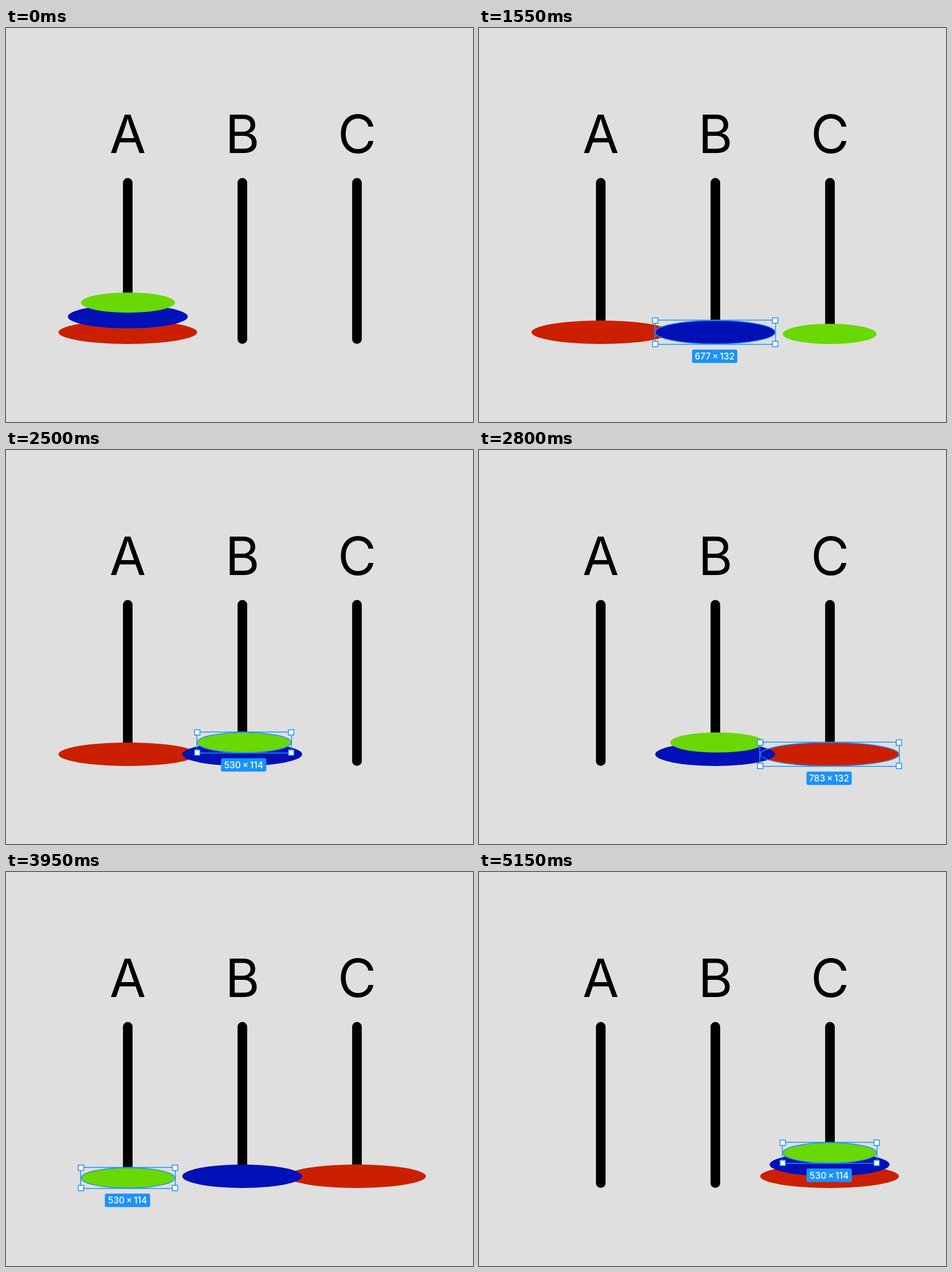
An HTML page that plays this animation: 815x687 px, repeating every 6700 ms.

```html
<!DOCTYPE html>
<html lang="en">
<head>
<meta charset="utf-8">
<title>Tower of Hanoi</title>
<style>
  html, body { margin: 0; width: 100%; height: 100%; overflow: hidden; background: #dfdfdf; }
  svg { display: block; width: 815px; height: 687px; font-family: Inter, sans-serif; }
  .letter { font-size: 92px; text-anchor: middle; }
  .peg { stroke: #000; stroke-width: 16.8; stroke-linecap: round; }
  .line { fill: none; stroke: #1b92fa; stroke-width: 1.5; }
  .handle { fill: #fff; stroke: #1b92fa; stroke-width: 1.5; }
  .badge { fill: #1b92fa; }
  .size { fill: #fff; font-size: 15.6px; font-weight: 500; text-anchor: middle; }
</style>
</head>
<body>
<svg id="stage" viewBox="0 0 815 687"></svg>
<script>
const LOOP = 6700;
const stage = document.getElementById("stage");

// Listed from back to front; w and h are the sizes shown in the badge.
const disks = {
  red:   { w: 783, h: 132, color: "#cc1f00", home: [212.6, 530.5] },
  blue:  { w: 677, h: 132, color: "#0210b7", home: [212.6, 503.3] },
  green: { w: 530, h: 114, color: "#69d804", home: [212.9, 478.8] }
};
const SCALE = 0.3092;

// [time, disk, x, y]
const moves = [
  [650,  "green", 612,   533.4],
  [1550, "blue",  412.2, 530.5],
  [2200, "green", 415.7, 510],
  [2800, "red",   611.8, 530.5],
  [3500, "green", 212.9, 533.4],
  [4050, "blue",  611.8, 510],
  [4650, "green", 612,   489.7]
];

function add(parent, tag, attrs, text) {
  const el = document.createElementNS("http://www.w3.org/2000/svg", tag);
  for (const name in attrs) el.setAttribute(name, attrs[name]);
  if (text) el.textContent = text;
  parent.append(el);
  return el;
}

["A", "B", "C"].forEach((letter, i) => {
  const x = 212.5 + 200 * i;
  add(stage, "text", { class: "letter", x, y: 217.7 }, letter);
  add(stage, "line", { class: "peg", x1: x, x2: x, y1: 269.9, y2: 542.4 });
});

function addSelection({ w, h, rx, ry }) {
  const g = add(stage, "g", {});
  add(g, "ellipse", { class: "line", rx, ry });
  add(g, "rect", { class: "line", x: -rx - 0.7, y: -ry - 0.7, width: 2 * rx + 1.4, height: 2 * ry + 1.4 });
  for (const x of [-rx, rx])
    for (const y of [-ry, ry])
      add(g, "rect", { class: "handle", x: x - 4.7, y: y - 4.7, width: 9.4, height: 9.4 });
  add(g, "rect", { class: "badge", x: -40.4, y: ry + 9.8, width: 79, height: 23.4, rx: 3 });
  add(g, "text", { class: "size", x: -0.9, y: ry + 27.2 }, `${w}\u2009×\u2009${h}`);
  return g;
}

const list = Object.values(disks);
for (const disk of list) {
  disk.rx = disk.w * SCALE / 2;
  disk.ry = disk.h * SCALE / 2;
  disk.shape = add(stage, "ellipse", { rx: disk.rx, ry: disk.ry, fill: disk.color });
}
for (const disk of list) disk.selection = addSelection(disk);

function render(time) {
  const done = moves.filter(move => move[0] <= time);
  const selected = done.length ? disks[done[done.length - 1][1]] : null;
  for (const disk of list) disk.pos = disk.home;
  for (const [, name, x, y] of done) disks[name].pos = [x, y];
  for (const { shape, selection, pos } of list) {
    const place = `translate(${pos})`;
    shape.setAttribute("transform", place);
    selection.setAttribute("transform", place);
  }
  for (const disk of list)
    disk.selection.setAttribute("visibility", disk === selected ? "visible" : "hidden");
}

const start = performance.now();
function tick() {
  render((performance.now() - start) % LOOP);
  requestAnimationFrame(tick);
}
tick();
</script>
</body>
</html>
```
